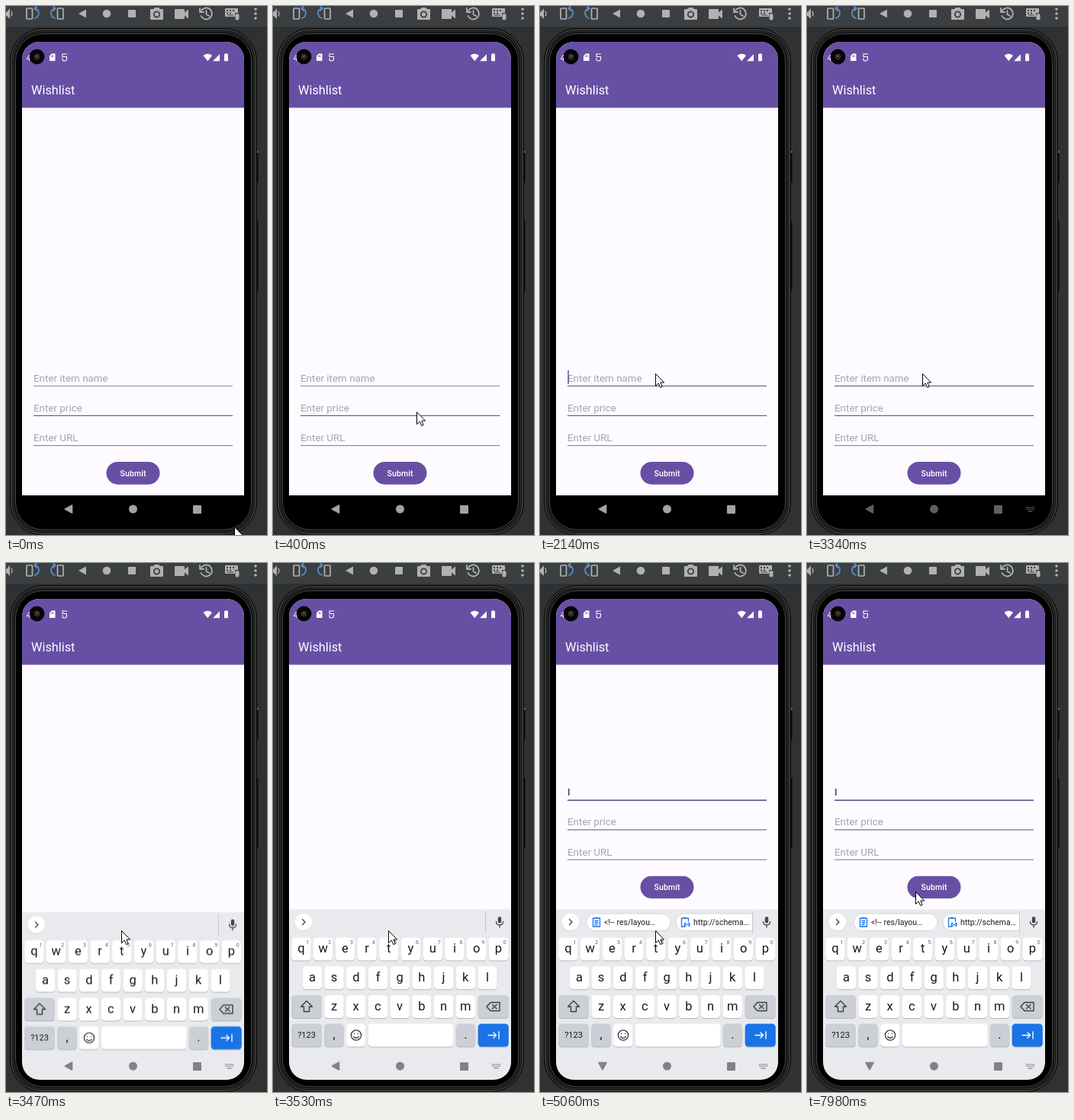
Recreate the animation shown at these times as an HTML page. Size 342 by 694 pixels, loop 8000 ms.

```html
<!DOCTYPE html>
<html lang="en">
<head>
<meta charset="utf-8">
<title>Wishlist</title>
<style>
html, body { margin: 0; width: 100%; height: 100%; overflow: hidden; background: #2f3133; }
svg { display: block; width: 342px; height: 694px; font-family: Roboto, sans-serif; }
.ln { fill: none; stroke-linecap: round; stroke-linejoin: round; }
.hint { font-size: 13.4px; fill: #a7a4a9; }
.mid { text-anchor: middle; }
.anim { animation: 8s step-end infinite; }

#cursor { animation-name: cursor; }
@keyframes cursor {
  0% { transform: translate(299px, 683px); }
  .87% { transform: translate(299px, 683px); animation-timing-function: steps(7, jump-both); }
  6.62% { transform: translate(151px, 482px); }
  99.74%, 100% { transform: translate(142px, 431px); }
}
#click { animation-name: click; }
@keyframes click { 0% { opacity: 0; } 9.86% { opacity: 1; } 11.61%, 100% { opacity: 0; } }

#form { animation-name: form; }
@keyframes form { 0% { transform: none; } 46.74%, 100% { transform: translateY(-187.5px); } }
#line { animation-name: line; }
@keyframes line {
  0% { fill: #918f95; height: 1px; }
  14.99% { fill: #56526a; height: 1px; }
  46.74%, 100% { fill: #5c4f80; height: 1.6px; }
}
#caret { animation-name: caret; }
@keyframes caret {
  0% { opacity: 0; } 14.99% { opacity: 1; } 19.86% { opacity: 0; }
  26.74% { opacity: 1; } 31.11%, 100% { opacity: 0; }
}
#caret2 { animation-name: caret2; }
@keyframes caret2 { 0% { opacity: 0; } 53.36% { opacity: 1; } 59.11%, 100% { opacity: 0; } }
#name { animation-name: name; }
@keyframes name { 0% { opacity: 1; } 53.36%, 100% { opacity: 0; } }
#typed { animation-name: typed; }
@keyframes typed { 0% { opacity: 0; } 53.36%, 100% { opacity: 1; } }

#board { animation-name: board; }
@keyframes board {
  0% { opacity: 0; transform: translateY(3.5px); }
  43.36% { opacity: 1; transform: translateY(3.5px); }
  44.11%, 100% { opacity: 1; transform: none; }
}
#chips { animation-name: chips; }
@keyframes chips { 0% { opacity: 0; } 50.86%, 100% { opacity: 1; } }

#nav { animation-name: nav; }
@keyframes nav {
  0% { fill: #a3a3a3; } 31.11% { fill: #808080; }
  32.61% { fill: #5f5f5f; } 43.36%, 100% { fill: #808285; }
}
#ime { animation-name: ime; }
@keyframes ime { 0% { opacity: 0; } 31.11% { opacity: .5; } 32.61%, 100% { opacity: 1; } }
#back { animation-name: back; transform-origin: 82px 660px; }
@keyframes back {
  0% { transform: none; }
  55.11% { transform: none; animation-timing-function: steps(4, jump-both); }
  59.11%, 100% { transform: rotate(-90deg); }
}
</style>
</head>
<body>
<svg viewBox="0 0 342 694">
  <defs>
    <clipPath id="screen"><rect x="21" y="47" width="291" height="631" rx="23"/></clipPath>
    <clipPath id="strip"><rect x="55" y="455" width="223" height="32"/></clipPath>
  </defs>

  <!-- emulator toolbar -->
  <rect width="342" height="28" fill="#3c3f41"/>
  <rect y="27.5" width="342" height="1" fill="#292b2c"/>
  <g fill="#afb1b3">
    <path d="M0 8H1L5 3V17L1 13H0z"/>
    <path class="ln" d="M7 7Q9 10 7 13" stroke="#afb1b3" stroke-width="1.3"/>
    <g id="rotate">
      <rect class="ln" x="27" y="3" width="7.500" height="14" rx="1" stroke="#afb1b3" stroke-width="1.700"/>
      <path class="ln" d="M37 3Q43 4 43 9T38 16M40 1L37 3L40 6" stroke="#5b8fd0" stroke-width="1.700"/>
    </g>
    <use href="#rotate" transform="matrix(-1 0 0 1 102 0)"/>
    <path d="M95 10L105 4.500V15.500z"/>
    <circle cx="132" cy="10" r="5.300"/>
    <rect x="160" y="5" width="10" height="10" rx="1"/>
    <path fill-rule="evenodd" d="M190 4H193L195 2H200L202 4H205Q206 4 206 5V17Q206 18 205 18H190Q189 18 189 17V5Q189 4 190 4zM197.500 6.500A4.500 4.500 0 1 0 197.510 6.500z"/>
    <circle cx="197.500" cy="11" r="2.700"/>
    <path d="M222 4H233Q234 4 234 5V8.500L239 4.500V16.500L234 12.500V16Q234 17 233 17H222Q221 17 221 16V5Q221 4 222 4z"/>
    <path class="ln" d="M255.500 13A7.500 7.500 0 1 0 256 6M254 3V8H259M262.500 6V11L266 13" stroke="#afb1b3" stroke-width="1.800"/>
    <path fill-rule="evenodd" d="M288 3H303Q304 3 304 4V9H300V14H288Q287 14 287 13V4Q287 3 288 3zM289 5V7H291V5zM293 5V7H295V5zM297 5V7H299V5zM289 8.500V10.500H291V8.500zM293 8.500V10.500H295V8.500zM290 11.500V12.500H298V11.500z"/>
    <rect x="300.500" y="10" width="5" height="8.500" rx="2.500"/>
    <circle cx="327" cy="4" r="1.800"/><circle cx="327" cy="10" r="1.800"/><circle cx="327" cy="16" r="1.800"/>
  </g>

  <!-- phone body -->
  <rect x="328" y="191" width="2.500" height="41" fill="#0b0b0b"/>
  <rect x="328" y="282" width="2.500" height="92" fill="#0b0b0b"/>
  <rect x="329" y="190.500" width="1.500" height="2" fill="#999"/>
  <rect x="5.500" y="29.500" width="323" height="664.500" rx="43" fill="#101010" stroke="#080808"/>
  <rect x="7" y="31" width="320" height="661.500" rx="41" fill="none" stroke="#5a5a5a"/>
  <rect x="9.500" y="33.500" width="315" height="656.500" rx="39" fill="none" stroke="#262626" stroke-width="2"/>
  <rect x="12.500" y="36.500" width="309" height="650.500" rx="36" fill="#000" stroke="#484848"/>

  <g clip-path="url(#screen)">
    <rect x="21" y="47" width="291" height="595" fill="#fdfbff"/>
    <rect x="21" y="47" width="291" height="86.500" fill="#6750a4"/>
    <rect x="21" y="642" width="291" height="36" fill="#000"/>

    <!-- status bar -->
    <g fill="#fff">
      <text x="26.500" y="71.500" font-size="10.500">4</text>
      <path fill-rule="evenodd" d="M60 62.500H64.500V72H57V65.500zM59.500 64.500V67H60.500V64.500zM61.300 64.500V67H62.300V64.500z"/>
      <path class="ln" d="M74 63V66.500H79.500M79.500 63H74M74 68.500V70.500Q74 72 76.700 72T79.500 69.500V66.500" stroke="#fff" stroke-width="1.100"/>
      <path d="M258.500 65Q264.300 60.500 270 65L264.300 72.300z"/>
      <path d="M271 72.300H280V63.300z"/>
      <path d="M287.200 62.300H289.800V63.300H291V72.300H286V63.300H287.200z"/>
      <text x="33" y="116.300" font-size="16.300">Wishlist</text>
    </g>
    <circle cx="40.500" cy="66.500" r="10" fill="#050505"/>
    <circle cx="40.500" cy="66.500" r="3.200" fill="#1b1b1d" stroke="#55565a" stroke-width=".8"/>
    <circle cx="40.500" cy="66" r="1" fill="#8a8c90"/>

    <!-- form -->
    <g id="form" class="anim">
      <text id="name" class="hint anim" x="36" y="492.600">Enter item name</text>
      <text class="hint" x="36" y="531.900">Enter price</text>
      <text class="hint" x="36" y="571.400">Enter URL</text>
      <rect id="line" class="anim" x="36" y="498" width="261" height="1"/>
      <rect x="36" y="537" width="261" height="1" fill="#57545b"/>
      <rect x="36" y="576.200" width="261" height="1" fill="#7b797f"/>
      <rect id="caret" class="anim" x="36.300" y="478" width="1.500" height="18" fill="#6750a4"/>
      <rect x="131.500" y="598" width="70" height="29.700" rx="14.850" fill="#6750a4"/>
      <text class="mid" x="166.600" y="616.800" font-size="10.500" font-weight="500" letter-spacing=".1" fill="#fff">Submit</text>
    </g>
    <text id="typed" class="anim" x="36" y="305.100" font-size="13.400" fill="#1d1b20">I</text>
    <rect id="caret2" class="anim" x="39.300" y="290" width="1.500" height="18" fill="#6750a4"/>

    <!-- keyboard -->
    <g id="board" class="anim">
      <rect x="21" y="454.500" width="291" height="230" fill="#e8eaed"/>
      <circle cx="40" cy="471.700" r="11.300" fill="#cfd1d5"/>
      <circle cx="40" cy="471" r="11.200" fill="#fff"/>
      <path class="ln" d="M38.500 467.500L42 471L38.500 474.500" stroke="#444746" stroke-width="1.400"/>
      <g id="chips" class="anim" clip-path="url(#strip)" font-size="10.500" fill="#1f1f1f">
        <g fill="#fff" stroke="#d3d6da">
          <rect x="61" y="460" width="110" height="22.500" rx="11.250"/>
          <rect x="178" y="460" width="120" height="22.500" rx="11.250"/>
        </g>
        <g class="ln" stroke="#1a73e8" stroke-width="1.300">
          <path d="M69.500 466H78.500V477H69.500zM72 469.500H76M72 472H76M72 474.500H75M72.500 465.500H75.500"/>
          <path d="M190 477H185.500V466H194.500V470M188.500 465.500H191.500"/>
          <path d="M191 472.500H190Q188.500 474.500 190 476H191M194.500 472.500H195.500Q197 474.500 195.500 476H194.500M191.500 474.300H194"/>
        </g>
        <text x="84" y="475">&lt;!-- res/layou…</text>
        <text x="201" y="475">http://schema…</text>
      </g>
      <rect x="278" y="457" width="1" height="29" fill="#c6c9cd"/>
      <rect x="294.800" y="464" width="4.400" height="8.500" rx="2.200" fill="#444746"/>
      <path class="ln" d="M292.500 470.500Q292.500 475 297 475T301.500 470.500M297 475V478" stroke="#444746" stroke-width="1.300"/>
      <g id="keys" class="mid"></g>
      <g class="ln" stroke="#3c4043" stroke-width="1.400">
        <path d="M44 574.500L51.500 582H47.500V588.500H40.500V582H36.500z"/>
        <path d="M285 576.500H297V587.500H285L280 582zM287.500 579.500L293 584.500M293 579.500L287.500 584.500"/>
        <circle cx="109" cy="619.500" r="6.600"/>
        <path d="M105.700 621.500Q109 625 112.300 621.500M106.700 617.500V617.600M111.300 617.500V617.600"/>
        <path d="M282 619.500H292.500M289 616L292.500 619.500L289 623M296 615V624" stroke="#fff"/>
      </g>
    </g>

    <!-- navigation -->
    <g id="nav" class="anim">
      <path id="back" class="anim" d="M77 659.300L86.200 654.300Q87.300 654 87.300 655V665Q87.300 666 86.200 665.700L77 660.700Q76 660 77 659.300z"/>
      <circle cx="166.500" cy="660" r="5.500"/>
      <rect x="245" y="655" width="11" height="11" rx="1"/>
      <path id="ime" class="anim" d="M287 657h1.400v1.400h-1.400zm2.400 0h1.400v1.400h-1.400zm2.400 0h1.400v1.400h-1.400zm2.400 0h1.400v1.400h-1.400zm2.400 0h1.400v1.400h-1.400zM287 659.500h1.400v1.400h-1.400zm2.400 0h1.400v1.400h-1.400zm2.400 0h1.400v1.400h-1.400zm2.400 0h1.400v1.400h-1.400zm2.400 0h1.400v1.400h-1.400zM289.500 662.200h6v1.400h-6z"/>
    </g>
  </g>

  <!-- pointer -->
  <g id="cursor" class="anim">
    <circle id="click" class="anim" r="12" fill="#ff0" fill-opacity=".47"/>
    <path d="M.5 .5V16.500L4.200 13L6.700 18.500L9.200 17.400L6.800 12H11.700z" fill="#fff" stroke="#000"/>
  </g>
</svg>
<script>
const keys = document.getElementById('keys');
const NS = 'http://www.w3.org/2000/svg';
const pitch = 28.7;
const GREY = '#cccfd5';

function add(tag, attrs, text = '') {
  const el = document.createElementNS(NS, tag);
  for (const k in attrs) el.setAttribute(k, attrs[k]);
  el.textContent = text;
  keys.append(el);
}

function key(cx, cy, width, label = '', fill = '#fff', size = 16.5) {
  const box = { x: cx - width / 2, width, height: 30, rx: 4.5 };
  add('rect', { ...box, y: cy - 14, fill: '#b3b6bb' });
  add('rect', { ...box, y: cy - 15, fill });
  add('text', { x: cx, y: cy + size * .3, 'font-size': size, fill: '#17181a' }, label);
}

function row(letters, x, y) {
  [...letters].forEach((c, i) => key(x + i * pitch, y, 25.4, c));
}

row('qwertyuiop', 37, 506.5);
row('asdfghjkl', 51.4, 544.2);
row('zxcvbnm', 80, 582);
[...'1234567890'].forEach((d, i) =>
  add('text', { x: 45.5 + i * pitch, y: 499.5, 'font-size': 7, fill: '#5f6368' }, d));

key(44, 582, 40, '', GREY);
key(288.7, 582, 40, '', GREY);
key(44, 619.5, 40, '?123', GREY, 11);
key(80, 619.5, 25.4, ',', GREY);
key(108.8, 619.5, 25.4);
key(180.7, 619.5, 112);
key(252.5, 619.5, 25.4, '.', GREY);
key(288.7, 619.5, 40, '', '#1a73e8');
</script>
</body>
</html>
```
